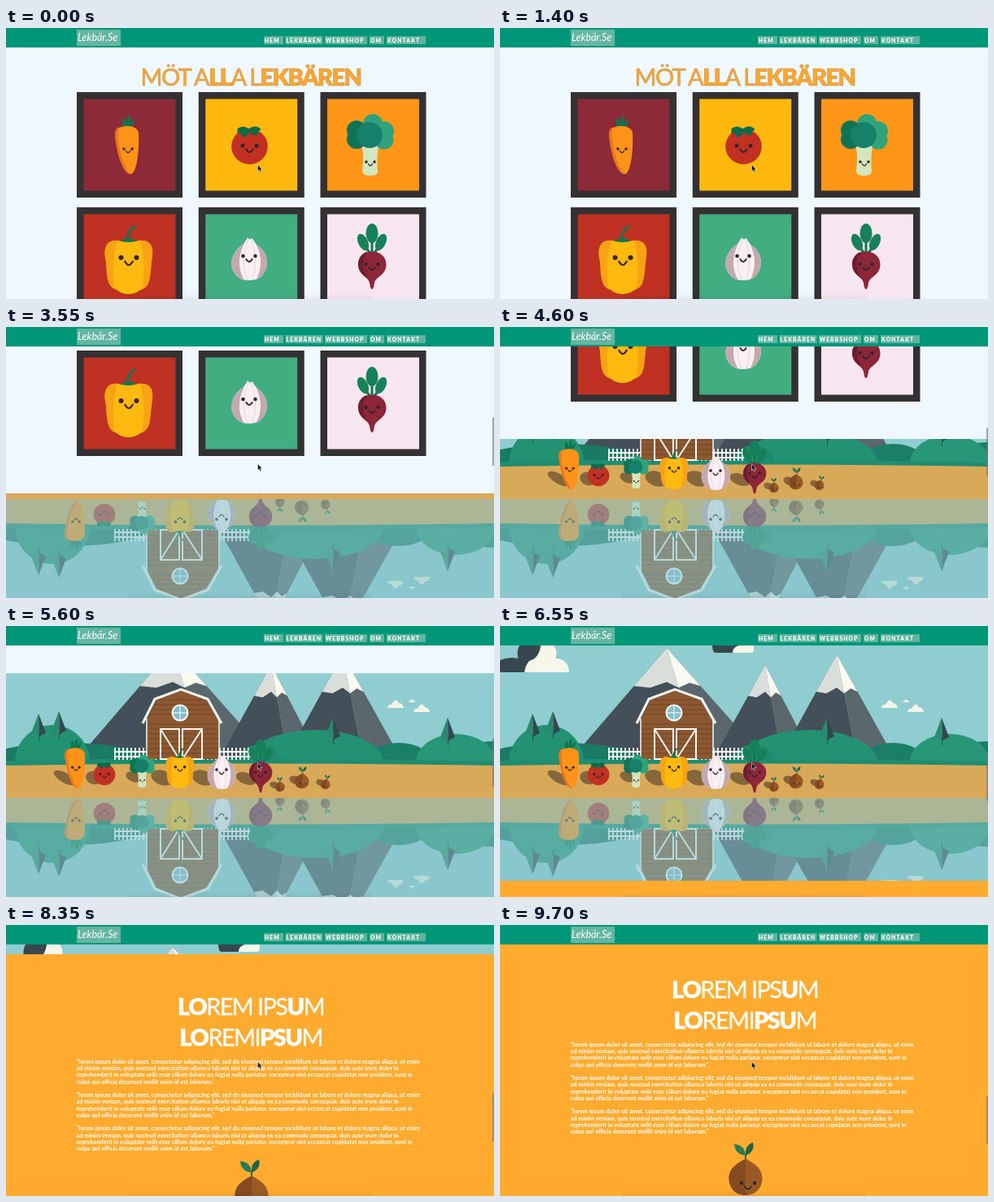
These frames come from a looping animation (600 by 334 pixels, 9.75 s). An HTML page:

```html
<!DOCTYPE html>
<html lang="sv">
<head>
<meta charset="utf-8">
<style>
  html, body { margin: 0; width: 100%; height: 100%; overflow: hidden; background: #f0f8ff; }
  svg { display: block; width: 600px; height: 334px; }
  text { font-family: Lato, sans-serif; fill: #fff; white-space: pre; }
  .head { font-size: 29px; font-weight: 400; letter-spacing: -1.6px; text-anchor: middle; stroke: #fff; stroke-width: .3px; }
  .head tspan { font-weight: 900; }
  .title { fill: #ffa62b; stroke: #b58a4c; stroke-width: .5px; }
  .nav { font-size: 6.6px; font-weight: 900; letter-spacing: 1.2px; }
  .logo { font-size: 12.5px; font-style: italic; }
  .body { font-size: 7.25px; font-weight: 700; }
</style>
</head>
<body>
<svg viewBox="0 0 600 334">
  <defs>
    <linearGradient id="dim" x2="0" y2="1">
      <stop stop-color="#000" stop-opacity="0"/><stop offset="1" stop-color="#000" stop-opacity=".06"/>
    </linearGradient>

    <g id="carrot">
      <path d="M-5-27Q-8-36-4-40Q-1-36 0-30Q-1-40 3-43Q5-38 3-30Q6-37 9-38Q9-31 4-26Z" fill="#0d7650"/>
      <path d="M-15-19C-15-32 13-33 14-20C15 0 12 30 4 30C-5 30-13 5-15-19Z" fill="#ff9218"/>
      <path d="M-15-19C-15-24-13-27-10-28C-15-12-5 20 4 30C-5 30-13 5-15-19Z" fill="#e9761d"/>
    </g>
    <g id="tomato">
      <ellipse rx="22.3" ry="22" fill="#c23022"/>
      <path d="M-14-15A22 22 0 0 0 5 21A22 22 0 0 1-14-15Z" fill="#a92a20"/>
      <path d="M-15-22Q-8-27-1-22Q8-28 14-21Q11-20 9-13Q3-14 0-18Q-3-12-8-11Q-9-17-15-16Z" fill="#0d6b48"/>
    </g>
    <g id="broccoli">
      <path d="M-11-5H13Q8 6 10 32Q9 36 0 36Q-8 36-9 31Q-6 8-11-5Z" fill="#d3e6bd"/>
      <g fill="#2fa37c"><circle cx="4" cy="-28" r="12"/><circle cx="18" cy="-19" r="12"/><circle cx="18" cy="-8" r="11.5"/></g>
      <g fill="#0f7457"><circle cx="-16" cy="-20" r="12"/><circle cx="-16" cy="-9" r="12"/></g>
      <circle cy="-14" r="16" fill="#17806a"/>
    </g>
    <g id="pepper">
      <path d="M-3-25Q-1-42 8-46" fill="none" stroke="#0d7650" stroke-width="3"/>
      <path d="M-12-26Q-1-36 11-26Z" fill="#0d7650"/>
      <path d="M-13-28C-28-30-32-18-28-2C-27 14-27 27-18 31C-12 34-10 38 0 38C8 38 12 34 18 31C27 27 26 14 28-2C31-18 28-30 12-28Q0-24-13-28Z" fill="#ffb90f"/>
      <path d="M14-28C30-29 31-17 28-2C26 14 27 28 16 32Q22 0 14-28ZM-14-28C-29-29-31-17-28-2C-26 14-27 28-17 32Q-23 0-14-28Z" fill="#f8a313"/>
    </g>
    <g id="garlic">
      <path d="M-2-28Q0-24 4-27Q7-20 14-15C22-8 25 6 18 16C12 28-12 28-18 16C-25 6-21-8-12-16Q-5-21-2-28Z" fill="#faf0f4"/>
      <path d="M-3-26Q-6-20-12-16C-21-8-25 6-18 16Q-14 23-6 25C-15 10-14-8-3-26ZM5-25Q8-19 14-15C22-8 25 6 18 16Q15 22 9 24C18 5 14-12 5-25Z" fill="#c3a9ad"/>
      <path d="M-1-26C-9-5-8 10-2 25M2-26C9-8 9 8 4 25" fill="none" stroke="#e8d3db"/>
    </g>
    <g id="beet">
      <path d="M0-12V-30M-2-14L-10-25M2-14L11-25" stroke="#0d7650" stroke-width="3"/>
      <g fill="#16805a"><ellipse cy="-39" rx="7.5" ry="12"/><ellipse cx="-11" cy="-28" rx="6" ry="11" transform="rotate(-25 -11 -28)"/><ellipse cx="11" cy="-28" rx="6" ry="11" transform="rotate(25 11 -28)"/></g>
      <path d="M-17 0C-18-22 18-22 17.5 0C17 13 5 14 3 22Q2 30 0 30Q-2 30-3 22C-5 14-16 13-17 0Z" fill="#8c2638"/>
      <path d="M-17 0C-17-9-12-15-6-16C-14-5-12 8-3 20C-5 14-16 13-17 0Z" fill="#6f1d30"/>
    </g>
    <g id="seed">
      <path d="M0-20V-29" stroke="#2c6b4c" stroke-width="2"/>
      <path d="M0-27Q-13-28-14-41Q-1-40 0-27Z" fill="#2c7a56"/><path d="M0-27Q-1-40 9-43Q12-32 0-27Z" fill="#1f6349"/>
      <path d="M0-23C8-18 20-13 20.500 1C20 16 10 22 0 22C-10 22-20 16-20.500 1C-20-13-8-18 0-23Z" fill="#9a5a26"/>
      <path d="M0-23C-8-18-20-13-20.500 1C-20 16-10 22 0 22Z" fill="#854a20"/>
    </g>

    <g id="barn">
      <path d="M173 164V116L185 91L215 79L246 91L261 116V164Z" fill="#8c5831"/>
      <path d="M173 121H261M173 127H261M173 133H261M173 139H261M173 145H261M173 151H261M173 157H261M176 109H258M180 103H254M183 97H248M188 91H242" stroke="#704427"/>
      <path d="M168 120L183 90L215 78L248 90L265 120" fill="none" stroke="#f7f7f2" stroke-width="3"/>
      <path d="M173 164V114M262 164V114" stroke="#f7f7f2" stroke-width="1.500"/>
      <circle cx="214" cy="107" r="9.500" fill="#86bdc9" stroke="#fff" stroke-width="2"/>
      <path d="M204 107H224M214 97V117" stroke="#fff"/>
      <path d="M190 127H213V164H190ZM217 127H241V164H217ZM190 127L213 164M241 127L217 164" fill="none" stroke="#f7f7f2" stroke-width="2"/>
    </g>
  </defs>

  <rect width="600" height="334" fill="#8fcdd0"/>
  <g id="scene"></g>
  <g id="page"></g>

  <rect y="327" x="150" width="300" height="7" fill="url(#dim)"/>
  <g id="header">
    <rect width="600" height="24" fill="#009678"/>
    <rect x="87" y="2" width="54" height="20" fill="#64b5a2"/>
    <text class="logo" x="88" y="16">Lekbär.Se</text>
  </g>
  <rect id="thumb" x="598" width="4" height="60" rx="1.500" fill="#777" opacity=".65"/>
  <path d="M309.500 168.500V176.500L311.300 175L312.500 178L314 177.300L312.700 174.500H315Z" fill="#111" stroke="#fff" stroke-width=".5"/>
</svg>
<script>
const $ = id => document.getElementById(id);
const add = (id, markup) => $(id).insertAdjacentHTML('beforeend', markup);
const rect = (x, y, w, h, fill) => `<rect x="${x}" y="${y}" width="${w}" height="${h}" fill="${fill}"/>`;
const oval = (x, y, rx, ry, fill) => `<ellipse cx="${x}" cy="${y}" rx="${rx}" ry="${ry}" fill="${fill}"/>`;
const shape = (d, fill) => `<path d="${d}" fill="${fill}"/>`;
const place = (name, x, y, s = 1, turn = 0) =>
  `<use href="#${name}" transform="translate(${x} ${y}) rotate(${turn}) scale(${s})"/>`;

// Eyes and smile: centre, half distance between the eyes, dot size
function face(name, x, y, gap, r) {
  add(name, oval(x - gap, y, r, r, '#33252a') + oval(x + gap, y, r, r, '#33252a') +
    `<path d="M${x - gap * .5} ${y + gap * .5}Q${x} ${y + gap * 1.4} ${x + gap * .5} ${y + gap * .5}"
      fill="none" stroke="#33252a" stroke-width="${r * .75}" stroke-linecap="round"/>`);
}
face('carrot', 1, -1, 5, 1.8);
face('tomato', 0, -1, 8.5, 2.5);
face('broccoli', 1, 19, 5, 1.8);
face('pepper', 0, -7, 9.5, 3);
face('garlic', 0, -5, 7.5, 2.3);
face('beet', 0, -1, 7.5, 2.2);
face('seed', 3, 7, 8, 2.2);

// Scenery
const BASE = 168;
function mountain(x, top, left, right, snow) {
  const k = snow / (BASE - top), low = top + snow, fold = x + (right - x) * .35;
  const [l, m, r] = [left, fold, right].map(side => x + (side - x) * k);
  return shape(`M${x} ${top}L${fold} ${BASE}H${left}Z`, '#434f59') +
    shape(`M${x} ${top}L${right} ${BASE}H${fold}Z`, '#5a676d') +
    shape(`M${x} ${top}L${m} ${low + 2}L${x} ${low - 5}L${(l + x) / 2} ${low + 2}L${l} ${low}Z`, '#d9dedb') +
    shape(`M${x} ${top}L${r} ${low}L${(m + r) / 2} ${low - 4}L${m} ${low + 2}Z`, '#fafaf0');
}
const hill = (x, rx, ry, fill) => shape(`M${x - rx} ${BASE}A${rx} ${ry} 0 0 1 ${x + rx} ${BASE}Z`, fill);
const cloud = (x, y, s) => `<path transform="translate(${x} ${y}) scale(${s})" fill="#f3f4e6" d="M0 0Q1-5 5-4Q10-14 14-6Q19-6 20 0Z"/>`;
const tree = (x, top) => shape(`M${x} ${top}L${x - 9} ${top + 24}L${x + 1} ${top + 28}Z`, '#2a8a6d') +
  shape(`M${x} ${top}L${x + 9} ${top + 24}L${x + 1} ${top + 28}Z`, '#33474f') + rect(x, top + 26, 1, 8, '#33474f');
const fence = (from, to) => {
  let d = `M${from} 155H${to}M${from} 161H${to}`;
  for (let x = from + 1; x < to; x += 5) d += `M${x} 150V165`;
  return `<path d="${d}" stroke="#fafaf5" stroke-width="1.800"/>`;
};
const shadow = (x, y, rx, ry, turn = 20) =>
  `<ellipse rx="${rx}" ry="${ry}" transform="translate(${x} ${y}) rotate(${turn})" fill="#86663b"/>`;

const land =
  mountain(326, 48, 260, 388, 38) + mountain(414, 35, 341, 488, 46) +
  cloud(469, 101, 1) + cloud(495, 94, .4) + cloud(501, 106, 1) +
  hill(75, 105, 24, '#1a7a64') + hill(57, 46, 46, '#239273') +
  hill(483, 40, 24, '#1b7f68') + hill(380, 84, 40, '#239273') + hill(312, 26, 22, '#1f8a6e') +
  hill(600, 50, 26, '#1b7f68') + hill(553, 49, 35, '#279777') +
  shape('M0 166Q300 160 600 167V185H0Z', '#1f8d70') +
  tree(40, 108) + tree(65, 105) + tree(402, 112) + tree(543, 113) +
  fence(133, 185) + fence(242, 301) + '<use href="#barn"/>' +
  shape('M0 172Q300 167 600 172V212H0Z', '#d9a95a');

const shadows =
  shadow(72, 187, 15, 6, 30) + shadow(108, 187, 10, 8) + shadow(157, 186, 10, 6) +
  shadow(192, 187, 14, 9) + shadow(242, 187, 14, 9) + shadow(295, 188, 13, 7) +
  shadow(330, 196, 6, 4) + shadow(356, 190, 8, 5) + shadow(387, 193, 6, 4);

const crop =
  place('carrot', 85, 175, .85) + place('tomato', 121, 183, .6) + place('broccoli', 167, 180, .53) +
  place('pepper', 214, 178, .59) + place('garlic', 265, 181, .8) + place('beet', 313, 181, .82) +
  place('seed', 337, 198, .28) + place('seed', 364, 191, .42, 5) + place('seed', 393, 195, .28, 15);

add('scene',
  shape('M0 57V42Q12 37 22 40Q20 30 24 24H66Q72 32 68 40Q84 40 85 57Z', '#f6f6ea') +
  shape('M0 57V42Q12 37 22 40Q20 30 24 24H50Q48 40 36 43Q31 49 30 57Z', '#37474f') +
  shape('M261 24H312V29Q312 33 308 33H265Q261 33 261 24Z', '#f6f6ea') +
  shape('M261 24H294Q286 26 286 33H265Q261 33 261 24Z', '#37474f') +
  mountain(205, 27, 84, 330, 47) +
  `<g transform="matrix(1 0 0 -1 0 414)">${land + crop}</g>` +
  '<rect y="200" width="600" height="134" fill="#85c3c9" opacity=".54"/>' + land + shadows + crop);

// Scrolling page
const bold = s => s.replace(/\[(.+?)\]/g, '<tspan>$1</tspan>');
const heading = (s, y, cls = '') => `<text class="head ${cls}" x="301" y="${y}">${bold(s)}</text>`;
const cards = [
  ['carrot', 149, 150, '#8c2a38'], ['tomato', 299.5, 146, '#ffb90e'], ['broccoli', 447, 146, '#ff9617'],
  ['pepper', 151, 290, '#be3123'], ['garlic', 299, 286, '#41ad81'], ['beet', 450, 292, '#f7e6ef']];
const lines = [
  '"lorem ipsum dolor sit amet, consectetur adipiscing elit, sed do eiusmod tempor incididunt ut labore et dolore magna aliqua. ut enim',
  'ad minim veniam, quis nostrud exercitation ullamco laboris nisi ut aliquip ex ea commodo consequat. duis aute irure dolor in',
  'reprehenderit in voluptate velit esse cillum dolore eu fugiat nulla pariatur. excepteur sint occaecat cupidatat non proident, sunt in',
  'culpa qui officia deserunt mollit anim id est laborum."'];

add('page', rect(0, 0, 600, 397, '#f0f8ff') + heading('MÖT A[LL]A L[EKBÄREN]', 71, 'title') +
  cards.map(([name, x, y, fill], i) => {
    const left = 87 + i % 3 * 149.75, top = i < 3 ? 79 : 221;
    return rect(left, top, 130, 130, '#333132') + rect(left + 8.5, top + 8.5, 113, 113, fill) + place(name, x, y);
  }).join('') +
  rect(0, 747, 600, 400, '#ffab2f') +
  heading('[LO]REM IPS[U]M', 822) + heading('[LO]REMI[PSU]M', 860) +
  [0, 1, 2].map(p => lines.map((s, i) =>
    `<text class="body" x="86.500" y="${881.7 + p * 41.3 + i * 8.3}">${s}</text>`).join('')).join('') +
  place('seed', 302, 1043));

add('header', [['HEM', 317, 24], ['LEKBÄREN', 343.5, 46], ['WEBBSHOP', 392, 52], ['OM', 447, 18], ['KONTAKT', 468, 48]]
  .map(([s, x, w]) => rect(x, 10, w, 10, '#5fb39f') + `<text class="nav" x="${x + 1}" y="18.300">${s}</text>`).join(''));

// Scroll position over time, smooth and never running backwards
const stops = [[0, 0], [1500, 0], [2050, 66], [2250, 94.5], [3550, 192], [4600, 259], [6550, 433], [8350, 711], [9700, 732], [9750, 732]];
const rate = i => (stops[i + 1][1] - stops[i][1]) / (stops[i + 1][0] - stops[i][0]);
const tangent = i => {
  if (i < 1 || i > stops.length - 2) return 0;
  const a = rate(i - 1), b = rate(i);
  return a * b > 0 ? 2 * a * b / (a + b) : 0;
};
function scrollAt(t) {
  const i = stops.findIndex((s, n) => n + 1 < stops.length && t < stops[n + 1][0]);
  const [t0, y0] = stops[i], [t1, y1] = stops[i + 1];
  const d = t1 - t0, u = (t - t0) / d, v = 1 - u;
  return y0 * v * v * (1 + 2 * u) + y1 * u * u * (3 - 2 * u) + d * u * v * (tangent(i) * v - tangent(i + 1) * u);
}

function draw(now) {
  const t = Math.floor(now % 9750 / 50) * 50, y = scrollAt(t);
  $('page').setAttribute('transform', `translate(0 ${-y})`);
  $('thumb').setAttribute('y', 76 + y * .184);
  $('thumb').style.display = y > 0 ? '' : 'none';
  requestAnimationFrame(draw);
}
draw(0);
</script>
</body>
</html>
```
